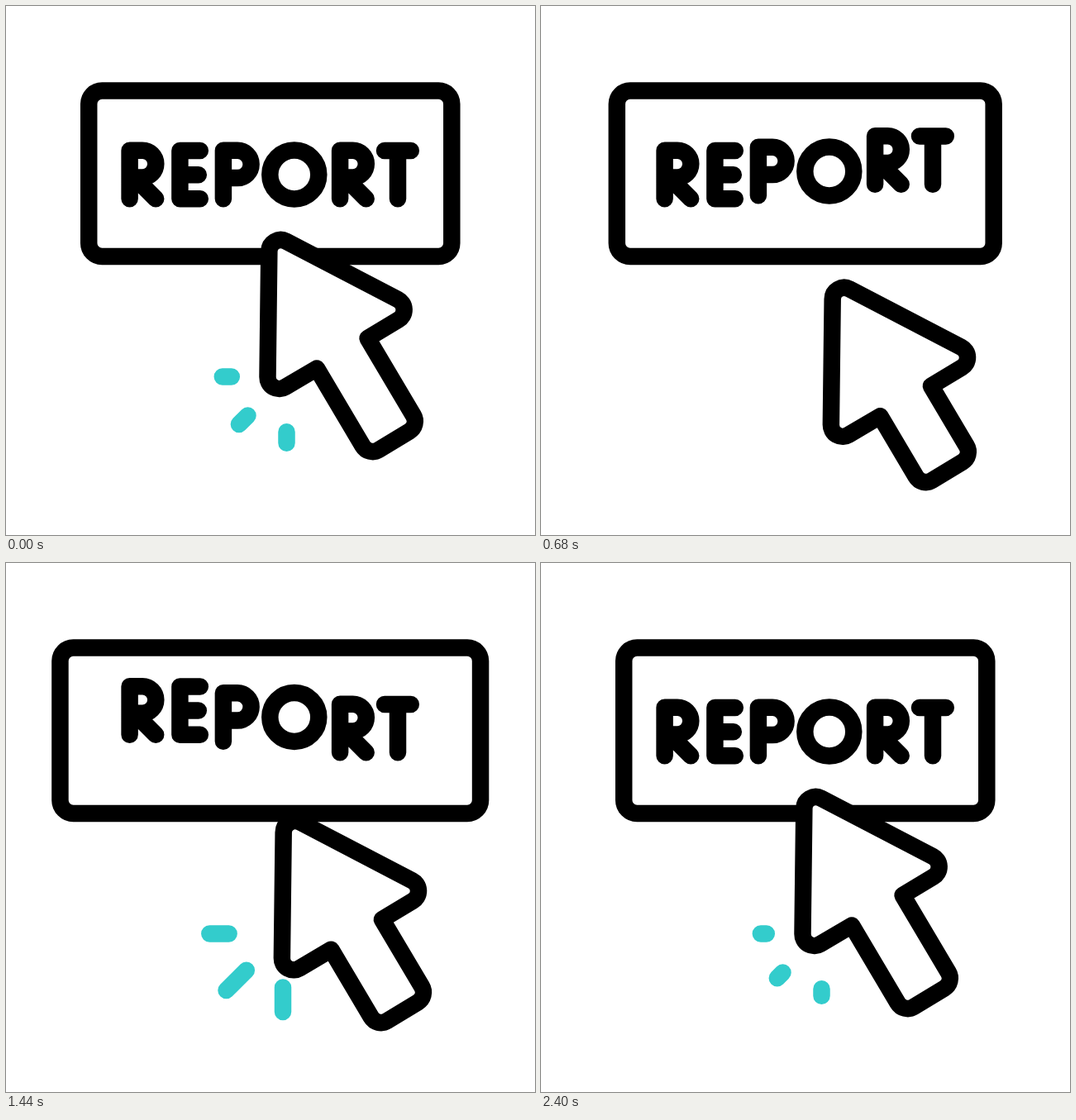
Recreate the animation shown at these times as an HTML page with a canvas. Size 640 by 640 pixels, loop 2.44 s.

```html
<!DOCTYPE html>
<html lang="en">
<head>
<meta charset="utf-8">
<title>Report button</title>
<style>
html, body { margin: 0; width: 100%; height: 100%; overflow: hidden; background: #fff; }
canvas { display: block; width: 640px; height: 640px; }
</style>
</head>
<body>
<canvas id="stage" width="640" height="640" aria-label="REPORT"></canvas>
<script>
const ctx = document.getElementById('stage').getContext('2d');
const STEP = 40, STEPS = 61, CYCLE = 28;
const INK = '#000', TEAL = '#33cccc';

const R = 'M149.6 233.3V174.8H165a16.2 16.2 0 0 1 0 32.6H149.6M160 212L181.2 233.3';
const letters = [
  { path: R, x: 0, delay: 0 },
  { path: 'M234.8 175H210.4V233.3H234.8M210.4 204.2H232.8', x: 0, delay: 0 },
  { path: 'M262.9 233.3V174.8H280a16.5 16.5 0 0 1 0 33.2H262.9', x: 0, delay: 3 },
  { path: 'M378.3 204a29.5 29.5 0 1 1 -59 0a29.5 29.5 0 1 1 59 0Z', x: 0, delay: 3 },
  { path: R, x: 254.5, delay: 6 },
  { path: 'M458 174.9H489.8M474 174.9V233.3', x: 0, delay: 6 },
].map(l => ({ ...l, path: new Path2D(l.path) }));

// Each spark line runs from its inner to its outer end.
const bursts = [
  { grow: 57, shrink: 63.6, lines: [[272.8, 448.5, 250.8, 448.5], [292.5, 495.5, 271.3, 516.7], [339.5, 515.3, 339.5, 542]] },
  { grow: 27.4, shrink: 35.6, lines: [[269.8, 448.5, 246.3, 448.5], [291, 492.5, 266.5, 517], [335, 513.3, 335, 543]] },
];

// Corner points with radius; "tail" corners slide separately from the head.
const cursor = [
  { x: 318.6, y: 274, r: 14 },
  { x: 496.3, y: 366.7, r: 14 },
  { x: 437.5, y: 402, r: 0 },
  { x: 499.9, y: 507.2, r: 14, tail: true },
  { x: 438.8, y: 544.4, r: 14, tail: true },
  { x: 376, y: 438.5, r: 0 },
  { x: 316.2, y: 473.8, r: 14 },
];
const headKeys = [0, 70, -33.7, 70, 0];
const tailKeys = [0, 45.6, -27, 45.6, 0];

const mix = (a, b, t) => a + (b - a) * t;
const ease = t => {
  t = Math.min(1, Math.max(0, t));
  return t * t * (3 - 2 * t);
};
const bump = (f, start, half) => ease(1 - Math.abs(f - start - half) / half);

function keyed(keys, f) {
  const i = Math.min(3, Math.floor(f / 14));
  return mix(keys[i], keys[i + 1], ease(f / 14 - i));
}

function drawButton(f) {
  const grow = 38.8 * bump(f, 0, 10);
  ctx.beginPath();
  ctx.roundRect(100.2 - grow, 102.5, 439.1 + 2 * grow, 200.5, 16);
  ctx.stroke();
}

function drawLetters(f) {
  for (const { path, x, delay } of letters) {
    ctx.save();
    ctx.translate(x, -25.6 * bump(f, delay, 8));
    ctx.stroke(path);
    ctx.restore();
  }
}

function drawBurst({ grow, shrink, lines }, f) {
  const head = ease((f - grow) / 8), tail = ease((f - shrink) / 8);
  if (head <= tail) return;
  ctx.beginPath();
  for (const [x1, y1, x2, y2] of lines) {
    ctx.moveTo(mix(x1, x2, tail), mix(y1, y2, tail));
    ctx.lineTo(mix(x1, x2, head), mix(y1, y2, head));
  }
  ctx.stroke();
}

function drawCursor(f) {
  const head = keyed(headKeys, f), tail = keyed(tailKeys, f);
  const points = cursor.map(p => {
    const d = p.tail ? tail : head;
    return { x: p.x + d * 0.595, y: p.y + d, r: p.r };
  });
  ctx.beginPath();
  ctx.moveTo((points[0].x + points[6].x) / 2, (points[0].y + points[6].y) / 2);
  points.forEach((p, i) => {
    const next = points[(i + 1) % points.length];
    if (p.r) ctx.arcTo(p.x, p.y, next.x, next.y, p.r);
    else ctx.lineTo(p.x, p.y);
  });
  ctx.closePath();
  ctx.fill();
  ctx.stroke();
}

function draw(now) {
  const f = Math.floor(now / STEP) % STEPS;
  const beat = f < 2 * CYCLE ? f % CYCLE : 0;
  ctx.fillStyle = '#fff';
  ctx.fillRect(0, 0, 640, 640);
  ctx.lineWidth = 20.5;
  ctx.lineCap = ctx.lineJoin = 'round';
  ctx.strokeStyle = INK;
  drawButton(beat);
  drawLetters(beat);
  ctx.strokeStyle = TEAL;
  drawBurst(bursts[0], f < CYCLE ? f + STEPS : f); // spans the loop seam
  drawBurst(bursts[1], f);
  ctx.strokeStyle = INK;
  drawCursor(Math.min(f, 2 * CYCLE));
  requestAnimationFrame(draw);
}
requestAnimationFrame(draw);
</script>
</body>
</html>
```
